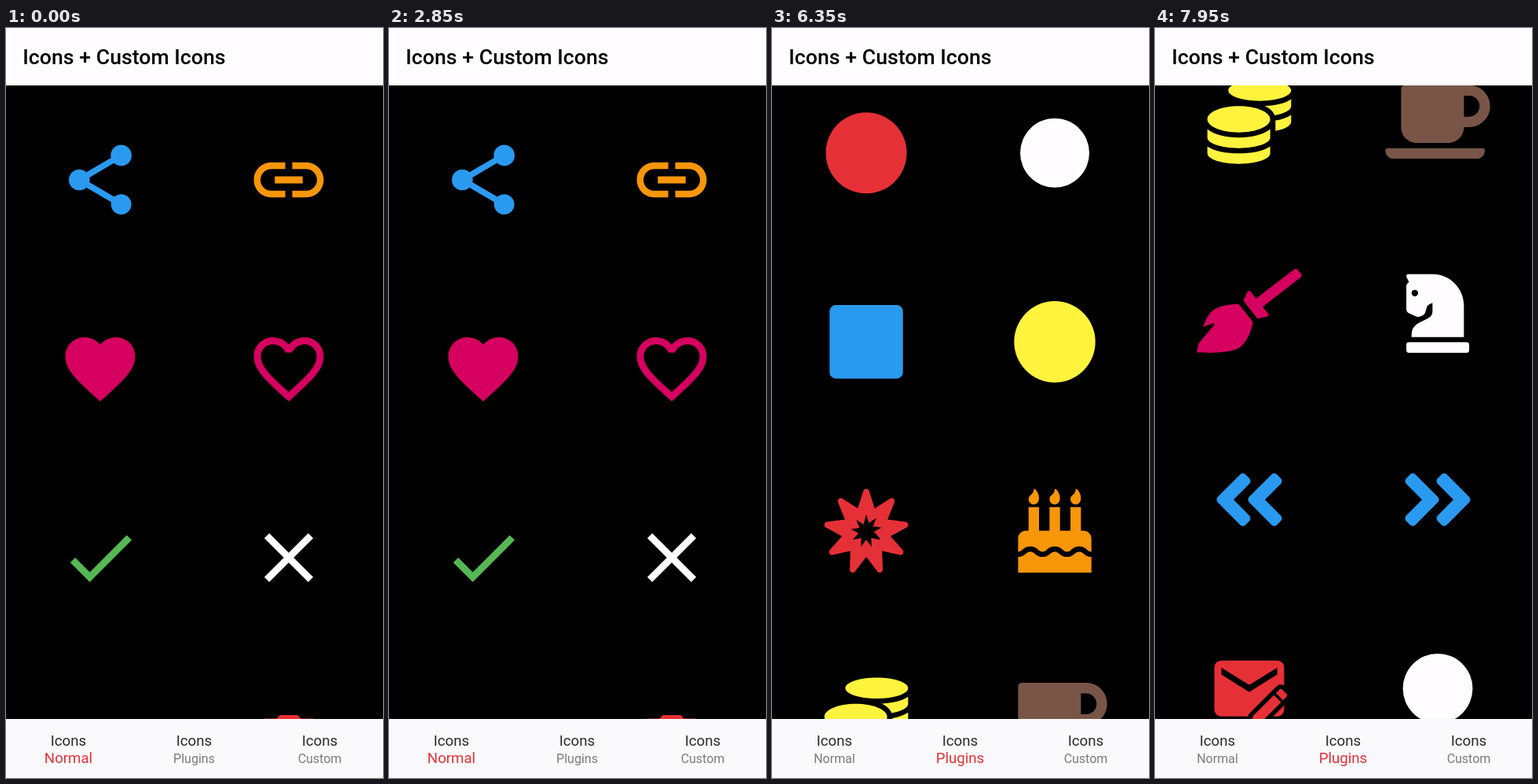
Write an HTML page that moves like this. It is 480 px wide and 953 px high and loops after 8 s.

```html
<!DOCTYPE html>
<html lang="en">
<head>
<meta charset="utf-8">
<title>Icons</title>
<style>
html, body { margin: 0; width: 100%; height: 100%; overflow: hidden; background: #000; }
svg { display: block; width: 100%; height: 100%; }
text { font-family: Roboto, Arial, sans-serif; }
</style>
</head>
<body>
<svg id="stage" viewBox="0 0 480 953">
  <g class="page"></g>
  <g class="page" display="none"></g>
  <ellipse id="glow" cx="330" fill="#e53935"/>
  <rect width="480" height="73" fill="#fffdff"/>
  <text x="21.33" y="46" font-size="26.67" font-weight="500">Icons + Custom Icons</text>
  <rect y="878" width="480" height="75" fill="#faf9fb"/>
  <clipPath id="bar"><rect y="878" width="480" height="75"/></clipPath>
  <g clip-path="url(#bar)"><circle id="ripple" cx="240" cy="915.5" opacity="0"/></g>
  <g id="tabs" text-anchor="middle"></g>
</svg>
<script>
const LOOP = 8000, ROW = 240, SIZE = 106.67, SWITCH = 5500;
const BLUE = '#2a9af0', ORANGE = '#f79609', PINK = '#d5005f', GREEN = '#55b854', WHITE = '#fffdff',
  AMBER = '#f9c40b', RED = '#e63037', PURPLE = '#8e0ea8', CORAL = '#f36142', YELLOW = '#fff33e', BROWN = '#795548';

const paths = {
  share: 'M18 16.08c-.76 0-1.44.3-1.96.77L8.91 12.7c.05-.23.09-.46.09-.7s-.04-.47-.09-.7l7.05-4.11c.54.5 1.25.81 2.04.81 1.66 0 3-1.34 3-3s-1.34-3-3-3-3 1.34-3 3c0 .24.04.47.09.7L8.04 9.81C7.5 9.31 6.79 9 6 9c-1.66 0-3 1.34-3 3s1.34 3 3 3c.79 0 1.5-.31 2.04-.81l7.12 4.16c-.05.21-.08.43-.08.65 0 1.61 1.31 2.92 2.92 2.92s2.92-1.31 2.92-2.92-1.31-2.92-2.92-2.92z',
  link: 'M3.9 12c0-1.71 1.39-3.1 3.1-3.1h4V7H7c-2.76 0-5 2.24-5 5s2.24 5 5 5h4v-1.9H7c-1.71 0-3.1-1.39-3.1-3.1zM8 13h8v-2H8v2zm9-6h-4v1.9h4c1.71 0 3.1 1.39 3.1 3.1s-1.39 3.1-3.1 3.1h-4V17h4c2.76 0 5-2.24 5-5s-2.24-5-5-5z',
  heart: 'M12 21.35l-1.45-1.32C5.4 15.36 2 12.28 2 8.5 2 5.42 4.42 3 7.5 3c1.74 0 3.41.81 4.5 2.09C13.09 3.81 14.76 3 16.5 3 19.58 3 22 5.42 22 8.5c0 3.78-3.4 6.86-8.55 11.54L12 21.35z',
  heartHole: 'M12.1 18.55l-.1.1-.1-.1C7.14 14.24 4 11.39 4 8.5 4 6.5 5.5 5 7.5 5c1.54 0 3.04.99 3.57 2.36h1.87C13.46 5.99 14.96 5 16.5 5c2 0 3.5 1.5 3.5 3.5 0 2.89-3.14 5.74-7.9 10.05z',
  check: 'M9 16.17L4.83 12l-1.42 1.41L9 19 21 7l-1.41-1.41z',
  close: 'M19 6.41L17.59 5 12 10.59 6.41 5 5 6.41 10.59 12 5 17.59 6.41 19 12 13.41 17.59 19 19 17.59 13.41 12z',
  people: 'M16 11c1.66 0 2.99-1.34 2.99-3S17.66 5 16 5c-1.66 0-3 1.34-3 3s1.34 3 3 3zm-8 0c1.66 0 2.99-1.34 2.99-3S9.66 5 8 5C6.34 5 5 6.34 5 8s1.34 3 3 3zm0 2c-2.33 0-7 1.17-7 3.5V19h14v-2.5c0-2.33-4.67-3.5-7-3.5zm8 0c-.29 0-.62.02-.97.05 1.16.84 1.97 1.97 1.97 3.45V19h6v-2.5c0-2.33-4.67-3.5-7-3.5z',
  trash: 'M6 19c0 1.1.9 2 2 2h8c1.1 0 2-.9 2-2V7H6v12zm2.46-7.12l1.41-1.41L12 12.59l2.12-2.12 1.41 1.41L13.41 14l2.12 2.12-1.41 1.41L12 15.41l-2.12 2.12-1.41-1.41L10.59 14l-2.13-2.12zM15.5 4l-1-1h-5l-1 1H5v2h14V4z',
  search: 'M15.5 14h-.79l-.28-.27C15.41 12.59 16 11.11 16 9.5 16 5.91 13.09 3 9.5 3S3 5.91 3 9.5 5.91 16 9.5 16c1.61 0 3.09-.59 4.23-1.57l.27.28v.79l5 4.99L20.49 19l-4.99-5zm-6 0C7.01 14 5 11.99 5 9.5S7.01 5 9.5 5 14 7.01 14 9.5 11.99 14 9.5 14z',
  help: 'M12 2C6.48 2 2 6.48 2 12s4.48 10 10 10 10-4.48 10-10S17.52 2 12 2zm1 17h-2v-2h2v2zm2.07-7.75l-.9.92C13.45 12.9 13 13.5 13 15h-2v-.5c0-1.1.45-2.1 1.17-2.83l1.24-1.26c.37-.36.59-.86.59-1.41 0-1.1-.9-2-2-2s-2 .9-2 2H8c0-2.21 1.79-4 4-4s4 1.79 4 4c0 .88-.36 1.68-.93 2.25z',
  call: 'M20.01 15.38c-1.23 0-2.42-.2-3.53-.56-.35-.12-.74-.03-1.01.24l-1.57 1.97c-2.83-1.35-5.48-3.9-6.89-6.83l1.95-1.66c.27-.28.35-.67.24-1.02-.37-1.11-.56-2.3-.56-3.53 0-.54-.45-.99-.99-.99H4.19C3.65 3 3 3.24 3 3.99 3 13.28 10.73 21 20.01 21c.71 0 .99-.63.99-1.18v-3.45c0-.54-.45-.99-.99-.99z',
  hangUp: 'M12 9c-1.6 0-3.15.25-4.6.72v3.1c0 .39-.23.74-.56.9-.98.49-1.87 1.12-2.66 1.85-.18.18-.43.28-.7.28-.28 0-.53-.11-.71-.29L.29 13.08c-.18-.17-.29-.42-.29-.7 0-.28.11-.53.29-.71C3.34 8.78 7.46 7 12 7s8.66 1.78 11.71 4.67c.18.18.29.43.29.71 0 .28-.11.53-.29.71l-2.48 2.48c-.18.18-.43.29-.71.29-.27 0-.52-.11-.7-.28-.79-.74-1.69-1.36-2.67-1.85-.33-.16-.56-.5-.56-.9v-3.1C15.15 9.25 13.6 9 12 9z',
  star: 'M496.25 202.52l-110-15.44 41.82-104.34c6.67-16.64-11.6-32.18-26.59-22.63L307.44 120 273.35 12.82C270.64 4.27 263.32 0 256 0c-7.32 0-14.64 4.27-17.35 12.82l-34.09 107.19-94.04-59.89c-14.99-9.55-33.25 5.99-26.59 22.63l41.82 104.34-110 15.43c-17.54 2.46-21.68 26.27-6.03 34.67l98.16 52.66-74.48 83.54c-10.92 12.25-1.72 30.93 13.29 30.93 1.31 0 2.67-.14 4.07-.45l108.57-23.65-4.11 112.55c-.43 11.65 8.87 19.22 18.41 19.22 5.15 0 10.39-2.21 14.2-7.18l68.18-88.9 68.18 88.9c3.81 4.97 9.04 7.18 14.2 7.18 9.54 0 18.84-7.57 18.41-19.22l-4.11-112.55 108.57 23.65c17.36 3.76 29.21-17.2 17.35-30.49l-74.48-83.54 98.16-52.66c15.64-8.39 11.5-32.2-6.04-34.66zM338.51 311.68l-51.89-11.3 1.97 53.79L256 311.68l-32.59 42.49 1.96-53.79-51.89 11.3 35.6-39.93-46.92-25.17 52.57-7.38-19.99-49.87 44.95 28.62L256 156.72l16.3 51.23 44.95-28.62-19.99 49.87 52.57 7.38-46.92 25.17 35.6 39.93z',
  cake: 'M448 384c-28.02 0-31.26-32-74.5-32-43.43 0-46.825 32-74.75 32-27.695 0-31.454-32-74.75-32-42.842 0-47.218 32-74.5 32-28.148 0-31.202-32-74.75-32-43.547 0-46.653 32-74.75 32v-80c0-26.5 21.5-48 48-48h16V112h64v144h64V112h64v144h64V112h64v144h16c26.5 0 48 21.5 48 48v80zm0 128H0v-96c43.356 0 46.767-32 74.75-32 27.951 0 31.253 32 74.75 32 42.843 0 47.217-32 74.5-32 28.148 0 31.201 32 74.75 32 43.357 0 46.767-32 74.75-32 27.488 0 31.252 32 74.5 32v96z'
    + [96, 224, 352].map(x => `M${x} 96c-17.75 0-32-14.25-32-32 0-31 32-23 32-64 12 0 32 29.5 32 56s-14.25 40-32 40z`).join(''),
  coins: 'M0 405.3V448c0 35.3 86 64 192 64s192-28.7 192-64v-42.7C342.7 434.4 267.2 448 192 448S41.3 434.4 0 405.3zM320 128c106 0 192-28.7 192-64S426 0 320 0 128 28.7 128 64s86 64 192 64zM0 300.4V352c0 35.3 86 64 192 64s192-28.7 192-64v-51.6c-41.3 34-116.9 51.6-192 51.6S41.3 334.4 0 300.4zm416 11c57.3-11.1 96-31.7 96-55.4v-42.7c-23.2 16.4-57.3 27.6-96 34.5v63.6zM192 160C86 160 0 195.8 0 240s86 80 192 80 192-35.8 192-80-86-80-192-80zm219.3 56.3c60-10.8 100.7-32 100.7-56.3v-42.7c-35.5 25.1-96.5 38.6-160.7 41.8 29.5 14.3 51.2 33.5 60 57.2z',
  cup: 'M192 384h192c53 0 96-43 96-96h32c70.6 0 128-57.4 128-128S582.6 32 512 32H120c-13.3 0-24 10.7-24 24v232c0 53 43 96 96 96zM512 96c35.3 0 64 28.7 64 64s-28.7 64-64 64h-32V96h32zm47.7 384H48.3c-47.6 0-61-64-36-64h583.3c25 0 11.8 64-35.9 64z',
  broom: 'M256.47 216.77l86.73 109.18s-16.6 102.36-76.57 150.12C206.66 523.85 0 510.19 0 510.19s3.8-23.14 11-55.43l94.62-112.17c3.97-4.7-.87-11.62-6.65-9.5l-60.4 22.09c14.44-41.66 32.72-80.04 54.6-97.47 59.97-47.76 163.3-40.94 163.3-40.94zM636.53 31.03l-19.86-25c-5.49-6.9-15.52-8.05-22.41-2.56l-232.48 177.8-34.14-42.97c-5.09-6.41-15.14-5.21-18.59 2.21l-25.33 54.55 86.73 109.18 58.8-12.45c8-1.69 11.42-11.2 6.34-17.6l-34.09-42.92 232.48-177.8c6.89-5.48 8.04-15.53 2.55-22.44z',
  knight: 'M19 272.47l40.63 18.06a32 32 0 0 0 24.88.47l12.78-5.12a32 32 0 0 0 18.76-20.5l9.22-30.65a24 24 0 0 1 12.55-15.65L159.94 208v50.33a48 48 0 0 1-26.53 42.94l-57.22 28.65A80 80 0 0 0 32 401.48V416h319.86V224c0-106-85.92-192-191.92-192H12A12 12 0 0 0 0 44a16.9 16.9 0 0 0 1.79 7.58L16 80l-9 9a24 24 0 0 0-7 17v137.21a32 32 0 0 0 19 29.26zM52 128a20 20 0 1 1-20 20 20 20 0 0 1 20-20zm316 320H16a16 16 0 0 0-16 16v32a16 16 0 0 0 16 16h352a16 16 0 0 0 16-16v-32a16 16 0 0 0-16-16z',
  chevrons: 'M223.7 239l136-136c9.4-9.4 24.6-9.4 33.9 0l22.6 22.6c9.4 9.4 9.4 24.6 0 33.9L319.9 256l96.4 96.4c9.4 9.4 9.4 24.6 0 33.9L393.7 409c-9.4 9.4-24.6 9.4-33.9 0l-136-136c-9.5-9.4-9.5-24.6-.1-34zm-192 34l136 136c9.4 9.4 24.6 9.4 33.9 0l22.6-22.6c9.4-9.4 9.4-24.6 0-33.9L127.9 256l96.4-96.4c9.4-9.4 9.4-24.6 0-33.9L201.7 103c-9.4-9.4-24.6-9.4-33.9 0l-136 136c-9.5 9.4-9.5 24.6-.1 34z',
  mail: 'M4 4h16a2 2 0 0 1 2 2v12a2 2 0 0 1-2 2H4a2 2 0 0 1-2-2V6a2 2 0 0 1 2-2zM20 8l-8 5-8-5V6l8 5 8-5z',
  pencil: 'M21.04 12.13c.14 0 .27.06.38.17l1.28 1.28c.22.21.22.56 0 .77l-1 1-2.05-2.05 1-1c.11-.11.25-.17.39-.17m-1.97 1.75l2.05 2.05L15.06 22H13v-2.06l6.07-6.06z'
};

// Icons are drawn around (0, 0); grid is the design height, width its design width.
const icon = (name, color, grid = 24, width = grid) =>
  `<path d="${paths[name]}" fill="${color}" fill-rule="evenodd" transform="scale(${SIZE / grid}) translate(${-width / 2} ${-grid / 2})"/>`;
const wide = (name, color, width = 512) => icon(name, color, 512, width);
const disc = (r, color) => `<circle r="${r}" fill="${color}"/>`;

const pages = [
  [icon('share', BLUE), icon('link', ORANGE),
    icon('heart', PINK), icon('heart', PINK) + icon('heartHole', '#000'),
    icon('check', GREEN), icon('close', WHITE),
    icon('people', AMBER), icon('trash', RED),
    icon('search', WHITE), icon('help', BLUE),
    icon('call', PURPLE), icon('hangUp', CORAL)],
  [disc(51.5, RED), disc(44, WHITE),
    `<rect x="-46.7" y="-46.7" width="93.4" height="93.4" rx="8" fill="${BLUE}"/>`, disc(51.7, YELLOW),
    wide('star', RED), wide('cake', ORANGE, 448),
    wide('coins', YELLOW), wide('cup', BROWN, 640),
    wide('broom', PINK, 640), wide('knight', WHITE, 384),
    wide('chevrons', BLUE, 448), `<g transform="scale(-1 1)">${wide('chevrons', BLUE, 448)}</g>`,
    icon('mail', RED) + `<g stroke="#000" stroke-width="2.5">${icon('pencil', '#000')}</g>` + icon('pencil', RED),
    disc(44.4, WHITE)]
];

const $ = id => document.getElementById(id);
const pageEls = [...document.querySelectorAll('.page')];
pages.forEach((list, p) => {
  pageEls[p].innerHTML = list.map((art, i) =>
    `<g transform="translate(${120 + i % 2 * 240} ${193 + (i >> 1) * ROW})">${art}</g>`).join('');
});
$('tabs').innerHTML = ['Normal', 'Plugins', 'Custom'].map((name, i) => {
  const x = 79.5 + i * 160;
  return `<text x="${x}" y="911.7" font-size="18.67" fill="#2a2a2c">Icons</text><text class="label" x="${x}" y="933.7">${name}</text>`;
}).join('');
const labels = [...document.querySelectorAll('.label')];

const clamp = x => Math.min(1, Math.max(0, x));
const mix = (a, b, k) => a + (b - a) * k;
const smooth = x => x * x * (3 - 2 * x);

// Smooth curve through [time, value] points that never overshoots.
function curve(pts, t) {
  const last = pts.length - 1;
  if (t <= pts[0][0]) return pts[0][1];
  if (t >= pts[last][0]) return pts[last][1];
  const slope = i => (pts[i + 1][1] - pts[i][1]) / (pts[i + 1][0] - pts[i][0]);
  const tangent = i => {
    if (i === 0) return 0;
    if (i === last) return slope(i - 1);
    const a = slope(i - 1), b = slope(i);
    return a * b > 0 ? 2 * a * b / (a + b) : 0;
  };
  const i = pts.findIndex(p => p[0] > t) - 1;
  const [t0, v0] = pts[i], [t1, v1] = pts[i + 1], h = t1 - t0, u = (t - t0) / h;
  return mix(v0, v1, smooth(u)) + h * u * (1 - u) * ((1 - u) * tangent(i) - u * tangent(i + 1));
}

const scrolls = [
  [[350, 0], [1000, 290], [1650, 580], [1850, 580], [2200, 260], [2520, 0], [2600, 0]],
  [[6150, 0], [6350, 34], [7000, 390], [7450, 438], [7950, 793], [8000, 828]]
];
const glowCurve = [[2450, 0], [2550, 1], [2720, 0], [4000, 0], [4500, 1.2], [4650, 1], [5000, 0], [5050, 0]];

function draw(t) {
  const page = t < SWITCH ? 0 : 1;
  pageEls.forEach((el, i) => {
    el.setAttribute('display', i === page ? 'inline' : 'none');
    el.setAttribute('transform', `translate(0 ${-curve(scrolls[i], t)})`);
  });

  const glow = curve(glowCurve, t);
  $('glow').setAttribute('cy', mix(-107, -45, Math.min(1, glow)));
  $('glow').setAttribute('rx', 500);
  $('glow').setAttribute('ry', 180);
  $('glow').setAttribute('opacity', .03 * glow);

  const k = smooth(clamp((t - SWITCH) / 200));
  labels.forEach((el, i) => {
    const on = [1 - k, k, 0][i];
    el.setAttribute('font-size', mix(16, 18.67, on));
    el.setAttribute('fill', `rgb(${mix(124, 229, on)},${mix(122, 50, on)},${mix(126, 54, on)})`);
  });

  $('ripple').setAttribute('r', mix(20, 88, clamp((t - 5400) / 250)));
  $('ripple').setAttribute('opacity', .08 * clamp((t - 5380) / 75) * clamp((5850 - t) / 300));
}

function tick(now) {
  draw(now % LOOP);
  requestAnimationFrame(tick);
}
draw(0);
requestAnimationFrame(tick);
</script>
</body>
</html>
```
